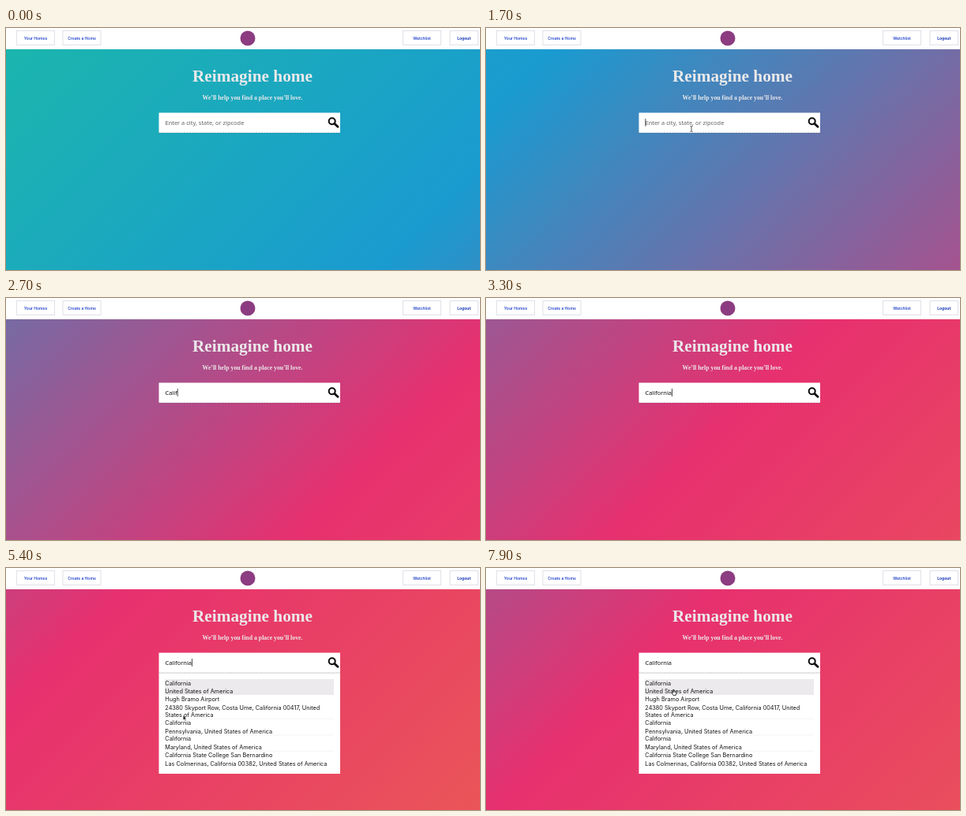
An HTML page for the animation above (8000 ms loop, 600 by 307 pixels).

```html
<!DOCTYPE html>
<html lang="en">
<head>
<meta charset="utf-8">
<title>Home search</title>
<style>
  html, body { margin: 0; width: 100%; height: 100%; overflow: hidden; background: #fff; }
  #stage { position: relative; width: 600px; height: 307px; overflow: hidden; }
  #backdrop {
    position: absolute; left: 0; top: 27px; width: 600px; height: 280px;
    background: linear-gradient(-45deg, #ec6c4a, #e7306f, #1a9bd0, #1cc49a);
    background-size: 400% 400%;
  }
  svg { position: absolute; left: 0; top: 0; }
  .nav rect { fill: #fff; stroke: #e0e0e8; }
  .nav text { font: 600 5px Inter, sans-serif; fill: #2446cc; text-anchor: middle; }
  .nav .strong { font-weight: 700; fill: #1233b4; }
  .hero { font-family: "Liberation Serif", Times, serif; font-weight: 700; fill: #ebe9ea; text-anchor: middle; }
  #query { font: 7.45px "Noto Sans", sans-serif; }
  #list text { font: 7.3px Inter, sans-serif; fill: #161616; }
</style>
</head>
<body>
<div id="stage">
  <div id="backdrop"></div>
  <svg width="600" height="307" viewBox="0 0 600 307">
    <rect width="600" height="27" fill="#fff"/>
    <g class="nav" id="nav"></g>
    <circle cx="306" cy="13" r="9.5" fill="#8c3c80"/>

    <text class="hero" x="312" y="67.5" font-size="21.3">Reimagine home</text>
    <text class="hero" x="312" y="90.5" font-size="7.8">We’ll help you find a place you’ll love.</text>

    <rect x="193.5" y="107.5" width="229.5" height="25.5" fill="#fff"/>
    <path d="M193.5 133H423" stroke="#555" stroke-opacity=".5" stroke-width=".7" stroke-dasharray="2 1.5"/>
    <g fill="none" stroke="#0a0a0a">
      <circle cx="412.7" cy="118.2" r="4" stroke-width="2"/>
      <path d="M415.8 121.3L420 125.3" stroke-width="2.8" stroke-linecap="round"/>
    </g>
    <text id="query" x="201.5" y="122.7"></text>
    <rect id="caret" y="115" width=".8" height="9.8" fill="#222"/>

    <g id="list">
      <rect x="193.5" y="133" width="229.5" height="128" fill="#fff"/>
      <path d="M193.5 133.3H423" stroke="#cfcfcf" stroke-width=".8"/>
      <rect x="201" y="141" width="214" height="20" fill="#eceaed"/>
    </g>

    <g id="pointer" stroke-linejoin="round">
      <path id="beam" d="M-1.6-3.5Q0-3.5 0-2.5Q0-3.5 1.6-3.5M0-2.5V2.5M-1.6 3.5Q0 3.5 0 2.5Q0 3.5 1.6 3.5" fill="none" stroke="#333" stroke-width=".8"/>
      <path id="arrow" d="M-1.8-3.2V3L-.4 1.8L.6 4L1.6 3.5L.7 1.4H2.5Z" fill="#111" stroke="#fff" stroke-width=".5"/>
      <path id="hand" d="M-1.2-3.6V.4L-2.4-.4L-2.8.5L-.9 3.6H2.2L2.8 1V-.6L-.2-1.2V-3.6Z" fill="#fff" stroke="#111" stroke-width=".8"/>
    </g>
  </svg>
</div>
<script>
const LOOP = 8000;
const byId = id => document.getElementById(id);
const [backdrop, nav, list, query, caret, pointer] =
  ["backdrop", "nav", "list", "query", "caret", "pointer"].map(byId);

function add(parent, tag, attrs, text = "") {
  const node = document.createElementNS("http://www.w3.org/2000/svg", tag);
  for (const key in attrs) node.setAttribute(key, attrs[key]);
  node.textContent = text;
  parent.append(node);
  return node;
}

for (const [label, x, width, style] of [
  ["Your Homes", 13.5, 48, ""], ["Create a Home", 72, 48, ""],
  ["Watchlist", 502.5, 48, ""], ["Logout", 562, 35.5, "strong"]
]) {
  add(nav, "rect", { x, y: 3.5, width, height: 18 });
  add(nav, "text", { x: x + width / 2, y: 14.7, class: style }, label);
}

for (const [y, line] of [
  [148.5, "California"], [159.2, "United States of America"],
  [169.1, "Hugh Bramo Airport"],
  [179.8, "24380 Skyport Row, Costa Ume, California 00417, United"],
  [189.2, "States of America"],
  [198.9, "California"], [209.8, "Pennsylvania, United States of America"],
  [219.4, "California"], [230.2, "Maryland, United States of America"],
  [240, "California State College San Bernardino"],
  [250.7, "Las Colmerinas, California 00382, United States of America"]
]) add(list, "text", { x: 201.3, y }, line);
for (const y of [191.3, 211.8, 232.3])
  add(list, "path", { d: `M201 ${y}H415`, stroke: "#eee", "stroke-width": .6 });

// [time, share of the gradient's travel]
const drift = [[0, 0], [400, .03], [1100, .18], [1700, .37], [2300, .61], [2800, .74],
  [3300, .83], [3900, .91], [4600, .96], [5400, .985], [6300, .99], [6600, .98], [7300, .91], [8000, .91]];
// [time, letters typed]
const typing = [[0, 0], [2100, 1], [2300, 2], [2500, 4], [2700, 5], [3000, 7], [3100, 8], [3300, 10]];
// [time, x, y]
const path = [[0, 290, 165], [400, 275, 145], [700, 260, 128], [4000, 260, 128], [4300, 235, 165],
  [4600, 221, 203], [5000, 221, 203], [5400, 226, 190], [5900, 235, 165], [6200, 238, 158], [8000, 238, 158]];
const shapes = [[0, ""], [100, "arrow"], [400, "beam"], [2000, ""], [4200, "arrow"], [6200, "hand"]];

const at = (steps, t) => steps.findLast(step => step[0] <= t);

function between(steps, t, column = 1) {
  const i = steps.findIndex(step => step[0] > t);
  const a = steps[i - 1], b = steps[i];
  return a[column] + (b[column] - a[column]) * (t - a[0]) / (b[0] - a[0]);
}

function caretOn(t) {
  if (t < 1100) return false;
  if (t < 2000) return (t - 1100) % 1000 < 500 || t >= 1600;
  return t < 3300 || (t - 3200) % 1000 < 500;
}

function draw(t) {
  backdrop.style.backgroundPosition = between(drift, t) * 100 + "% 50%";

  const typed = "California".slice(0, at(typing, t)[1]);
  query.textContent = typed || "Enter a city, state, or zipcode";
  query.setAttribute("fill", typed ? "#111" : "#626262");
  caret.setAttribute("x", 201.5 + (typed ? query.getComputedTextLength() : 0));
  caret.style.visibility = caretOn(t) ? "visible" : "hidden";
  list.style.visibility = t >= 3900 ? "visible" : "hidden";

  const shape = at(shapes, t)[1];
  for (const node of pointer.children) node.style.display = node.id === shape ? "" : "none";
  pointer.setAttribute("transform", `translate(${between(path, t)} ${between(path, t, 2)})`);
}

const start = performance.now();
function tick() {
  draw((performance.now() - start) % LOOP);
  requestAnimationFrame(tick);
}
tick();
</script>
</body>
</html>
```
